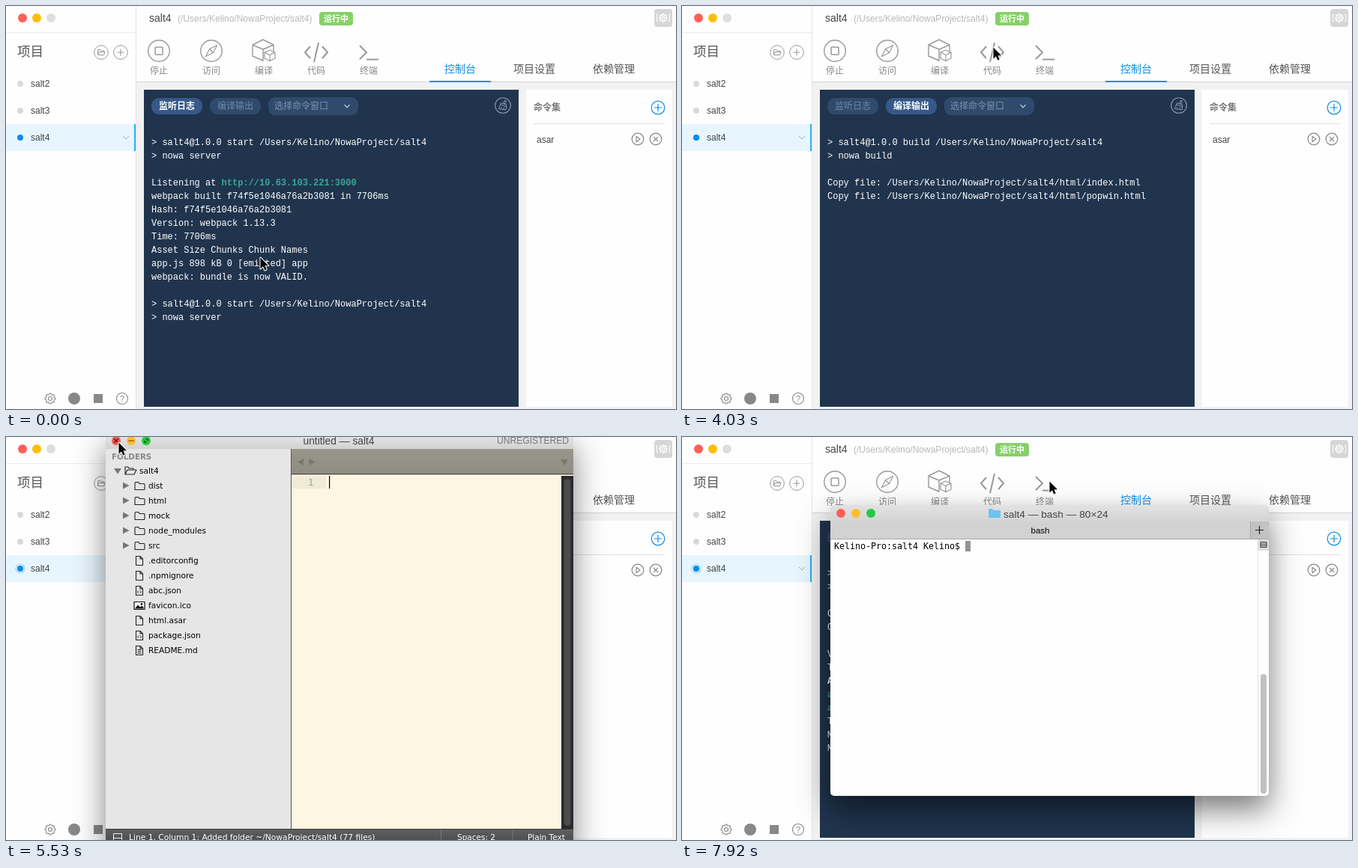
These frames come from a looping animation (894 by 539 pixels, 8000 ms). An HTML page with a canvas:

```html
<!DOCTYPE html>
<html lang="zh">
<head>
<meta charset="utf-8">
<title>Console</title>
<style>
html, body { margin: 0; width: 100%; height: 100%; overflow: hidden; background: #fff; }
canvas { display: block; width: 894px; height: 539px; }
</style>
</head>
<body>
<canvas id="stage"></canvas>
<script>
const W = 894, H = 539, LOOP = 8000;
const canvas = document.getElementById('stage');
const c = canvas.getContext('2d');
const dpr = window.devicePixelRatio || 1;
canvas.width = W * dpr;
canvas.height = H * dpr;

const UI = '"Liberation Sans", "Noto Sans CJK SC", "Noto Sans CJK", sans-serif';
const COURIER = '"Liberation Mono", monospace';
const MENLO = '"DejaVu Sans Mono", monospace';
const LUCIDA = '"DejaVu Sans", sans-serif';
const BLUE = '#108ee9', GREY = '#999';
const USER = 'Kelino';
const ROOT = `/Users/${USER}/NowaProject/salt4`;

const TICK = 150, SHORT = [19, 26, 43, 46, 50];
const tickStart = k => k === 53 ? 7920 : k * TICK - 10 * SHORT.filter(s => s <= k).length;
const STARTS = Array.from({ length: 54 }, (_, k) => tickStart(k));

// Ticks at which something switches
const AT = {
  relisten: 4, hoverBuild: 15, buildTab: 17, build: 20, leaveBuild: 23, copy: 24, hoverCode: 24,
  leaveCode: 27, editor: 28, focus: 30, folder: 31, closeHover: 36, closed: 38,
  stats: 40, pool: 42, hoverTerm: 42, minify: 48, minify2: 49, leaveTerm: 50,
  terminal: 52, prompt: 53
};

// tick, x, y of the pointer; linear in between
const PATH = [
  [0, 339, 336], [1, 333, 336], [11, 333, 336], [14, 338, 130], [16, 343, 56], [18, 341, 58],
  [22, 341, 58], [25, 412, 62], [26, 415, 55], [31, 415, 55], [35, 190, 18], [36, 153, 9],
  [37, 150, 7], [38, 367, 34], [39, 455, 48], [40, 502, 56], [41, 521, 62], [43, 490, 59], [53, 490, 59]
];

// *bold*, ~teal~
const WATCH = [
  `> salt4@1.0.0 start ${ROOT}`, '> nowa server', '',
  'Listening at ~http://10.63.103.221:3000~',
  'webpack built f74f5e1046a76a2b3081 in 7706ms', 'Hash: f74f5e1046a76a2b3081',
  'Version: webpack 1.13.3', 'Time: 7706ms', 'Asset Size Chunks Chunk Names',
  'app.js 898 kB 0 [emitted] app', 'webpack: bundle is now VALID.', '',
  `> salt4@1.0.0 start ${ROOT}`, '> nowa server', '',
  'Listening at ~http://10.63.103.221:3000~'
];
const BUILD = [
  `> salt4@1.0.0 build ${ROOT}`, '> nowa build', '',
  `Copy file: ${ROOT}/html/index.html`, `Copy file: ${ROOT}/html/popwin.html`, '',
  'Version: webpack *1.13.3*', 'Time: *2260*ms', '*Asset Size Chunks Chunk Names*',
  '~app.js~ 29.5 kB *0* ~[emitted]~ app', '~app.css~ 132 bytes *0* ~[emitted]~ app',
  'Thread Pool Size: 2', `Minify file: ${ROOT}/dist/app.js`, `Minify file: ${ROOT}/dist/app.css`
];

function text(s, x, y, size, color, { font = UI, weight = 'normal', align = 'left' } = {}) {
  c.font = `${weight} ${size}px ${font}`;
  c.fillStyle = color;
  c.textAlign = align;
  c.fillText(s, x, y + size * 0.37);
}
function rect(x, y, w, h, color) {
  c.fillStyle = color;
  c.fillRect(x, y, w, h);
}
function pill(x, y, w, h, r, color) {
  c.beginPath();
  c.roundRect(x, y, w, h, r);
  c.fillStyle = color;
  c.fill();
}
function disc(x, y, r, color) {
  c.beginPath();
  c.arc(x, y, r, 0, 7);
  c.fillStyle = color;
  c.fill();
}
function ring(x, y, r, color, width = 1.1) {
  c.beginPath();
  c.arc(x, y, r, 0, 7);
  c.strokeStyle = color;
  c.lineWidth = width;
  c.stroke();
}
// SVG path drawn with its origin at x, y
function draw(d, x, y, stroke, width = 1.1, fill) {
  const p = new Path2D(d);
  c.save();
  c.translate(x, y);
  c.lineJoin = 'round';
  if (fill) { c.fillStyle = fill; c.fill(p); }
  if (stroke) { c.strokeStyle = stroke; c.lineWidth = width; c.stroke(p); }
  c.restore();
}
function gradient(y0, y1, a, b) {
  const g = c.createLinearGradient(0, y0, 0, y1);
  g.addColorStop(0, a);
  g.addColorStop(1, b);
  return g;
}
function shadowed(alpha, blur, dy, paint) {
  c.save();
  c.shadowColor = `rgba(0,0,0,${alpha})`;
  c.shadowBlur = blur * dpr;
  c.shadowOffsetY = dy * dpr;
  paint();
  c.restore();
}
function gear(x, y, r, color, width) {
  c.beginPath();
  for (let i = 0; i <= 64; i++) {
    const a = i / 64 * Math.PI * 2, q = r + Math.max(-0.7, Math.min(0.7, Math.cos(a * 8) * 1.4));
    c.lineTo(x + Math.cos(a) * q, y + Math.sin(a) * q);
  }
  c.strokeStyle = color;
  c.lineWidth = width;
  c.stroke();
  ring(x, y, r * 0.4, color, width);
}

function sidebar(k) {
  rect(0, 0, 173, H, '#fefefe');
  rect(173, 0, 1, H, '#e4e4e4');
  rect(0, 35, 173, 1, '#ececec');
  ['#ff5f57', '#ffbd05', '#dedede'].forEach((col, i) => disc(22 + 19 * i, 16, 6, col));
  text('项目', 15, 61, 17.5, '#555');
  ring(127, 62, 9.3, GREY, 1);
  draw('M-4.5 3.5V-3.5H-1L0-2H4V-.5M-4.5 3.5L-3-.5H5L3.8 3.5Z', 127, 62, GREY, 1);
  ring(153, 62, 9.3, GREY, 1);
  draw('M-4.5 0H4.5M0-4.5V4.5', 153, 62, GREY, 1.1);

  rect(0, 158, 173, 36, '#e7f5fe');
  rect(171, 158, 2, 36, '#2db0ee');
  ['salt2', 'salt3', 'salt4'].forEach((s, i) => {
    const y = 104 + 36 * i;
    disc(19, y, 4, i === 2 ? '#0a8cf0' : '#d9d9d9');
    text(s, 33, y, 12, '#444');
  });
  draw('M-4-2L0 2L4-2', 160, 176, '#9ab', 1);

  // status pulse, 1.2 s per beat
  const p = (k * TICK + 1070) % 1200 / 1200;
  const e = p * p * (3 - 2 * p), scale = 0.8 + 1.6 * e, fade = 0.5 * (1 - e);
  if (scale > 1 && fade > 0.05) {
    c.globalAlpha = fade;
    ring(19, 176, 4 * scale - scale / 2, '#0a8cf0', scale);
    c.globalAlpha = 1;
  }

  gear(59, 525, 6.3, '#888', 1.1);
  disc(91, 525, 8, '#888');
  rect(117, 519, 12, 12, '#888');
  ring(155, 525, 7.5, '#888', 1.1);
  text('?', 155, 525, 11, '#888', { align: 'center' });
}

function toolbar(hover) {
  rect(174, 0, W - 174, 101, '#fefefe');
  rect(174, 101, W - 174, 1, '#d4d4d4');
  text('salt4', 191, 16, 14, '#444');
  text(`(${ROOT})`, 229, 17, 12, '#b8b8b8');
  pill(418, 8, 45, 18, 4, '#87d068');
  text('运行中', 440.5, 17, 11, '#fff', { align: 'center', weight: 'bold' });
  pill(865, 4, 24, 24, 4, '#d6d6d6');
  gear(877, 16, 4.6, '#fff', 1.3);
  draw('M-7-4.5H-8.5V4.5H-7M7-4.5H8.5V4.5H7', 877, 16, '#fff', 1);

  const tint = i => hover === i ? BLUE : GREY;
  ring(204, 60, 14.3, GREY, 1.4);
  draw('M-4-5H4Q5-5 5-4V4Q5 5 4 5H-4Q-5 5-5 4V-4Q-5-5-4-5Z', 204, 60, GREY, 1.5);
  ring(274, 60, 14.3, GREY, 1.4);
  draw('M7.5-7.5L2.5 2.5L-7.5 7.5L-2.5-2.5ZM-2.5-2.5L2.5 2.5', 274, 60, GREY, 1.2);
  draw('M-14-7L0-14L14-7L0-1ZM-14-7V8L0 14V-1M14-7V4', 343, 59, tint(2), 1.4);
  draw('M-7-4L0-7L7-4V4L0 7.5L-7 4ZM-7-4L0-.5L7-4M0-.5V7.5', 352, 66, tint(2), 1.2, '#fefefe');
  draw('M-8-8L-15 0L-8 8M8-8L15 0L8 8M3-13L-3 13', 414, 62, tint(3), 2);
  draw('M-12-9L-3 0L-12 9M-3 9.5H13', 484, 62, tint(4), 2);
  ['停止', '访问', '编译', '代码', '终端'].forEach((s, i) =>
    text(s, 204 + 70 * i, 87, 12, hover === i ? BLUE : '#888',
      { align: 'center', weight: hover === i ? 'bold' : 'normal' }));

  text('控制台', 606, 84, 14, BLUE, { align: 'center' });
  text('项目设置', 705, 84, 14, '#555', { align: 'center' });
  text('依赖管理', 811, 84, 14, '#555', { align: 'center' });
  rect(565, 100, 82, 2, BLUE);
}

function commands() {
  rect(694, 112, 195, 424, '#fefefe');
  text('命令集', 704, 136, 12, '#777', { weight: 'bold' });
  ring(870, 136, 8.8, BLUE, 1.2);
  draw('M-5 0H5M0-5V5', 870, 136, BLUE, 1.2);
  rect(704, 157, 175, 1, '#e0e0e0');
  text('asar', 708, 179, 12, '#444');
  ring(843, 178, 7.8, '#888', 1.2);
  draw('M-2-3.8L3 0L-2 3.8Z', 843, 178, '#888', 1.1);
  ring(867, 178, 7.8, '#888', 1.2);
  draw('M-3-3L3 3M3-3L-3 3', 867, 178, '#888', 1.1);
}

function logLine(s, y) {
  let x = 194;
  s.split(/([*~][^*~]+[*~])/).forEach(part => {
    const mark = /^[*~]/.test(part) ? part[0] : '';
    const run = mark ? part.slice(1, -1) : part;
    text(run, x, y, 12, mark === '~' ? '#3ca595' : '#fff',
      { font: COURIER, weight: mark ? 'bold' : 'normal' });
    x += c.measureText(run).width;
  });
}

function logPanel(k) {
  rect(184, 112, 500, 424, '#20344d');
  const building = k >= AT.buildTab;
  ['监听日志', '编译输出'].forEach((s, i) => {
    const on = building === (i === 1), x = 194 + 78 * i;
    pill(x, 123, 68, 22, 10, on ? '#36598a' : '#2f4a6c');
    text(s, x + 34, 134, 12, on ? '#fff' : '#7388a4', { align: 'center', weight: on ? 'bold' : 'normal' });
  });
  pill(350, 122, 120, 24, 9, '#2f4a6c');
  text('选择命令窗口', 358, 134, 12, '#7d91ab');
  draw('M-3.5-2L0 1.7L3.5-2', 455, 134, '#b4c0cf', 1.3);

  const count = !building ? (k >= AT.relisten ? 16 : 14)
    : k >= AT.minify2 ? 14 : k >= AT.minify ? 13 : k >= AT.pool ? 12
    : k >= AT.stats ? 11 : k >= AT.copy ? 5 : k >= AT.build ? 2 : 0;
  (building ? BUILD : WATCH).slice(0, count).forEach((s, i) => logLine(s, 182 + 18 * i));
  if (count) {
    ring(663, 133, 10.3, '#8b9bb1', 1.1);
    draw('M2.5-7L4.5-6L3-2L1-2.8ZM-2.5-3.5L5-.5L4 6L-5.5 4.5ZM-3.5-1.2L4.6 1.8M-2.5 4.5L-2 2M1 5L1.4 2.6',
      663, 133, '#8b9bb1', 1);
  }
}

function fileIcon(kind, x, y) {
  if (kind === 'dir') draw('M-6 5V-4Q-6-5-5-5H-1L0-3H6Q7-3 7-2V4Q7 5 6 5Z', x, y, '#222', 1.1);
  else if (kind === 'img') {
    draw('M-7-5H7V5H-7Z', x, y, '#111', 1.2, '#fff');
    draw('M-6 4L-2-1L1 2L4 0L6 4Z', x, y, null, 0, '#111');
    disc(x + 3, y - 2, 1.4, '#111');
  } else {
    draw('M-4.5-6H1L4.5-2.5V6H-4.5ZM1-6V-2.5H4.5', x, y, '#222', 1.1);
    if (kind === 'code') draw('M-1 0L-2.5 1.7L-1 3.4M1 0L2.5 1.7L1 3.4', x, y, '#222', 1);
    if (kind === 'md') draw('M-2.5-1H2.5M-2.5 1.3H2.5M-2.5 3.6H2.5', x, y, '#222', 1);
  }
}

function fileTree() {
  rect(133, 16, 247, 508, '#e6e6e6');
  rect(380, 16, 1, 508, '#555');
  text('FOLDERS', 141, 26, 10.3, '#888', { font: LUCIDA, weight: 'bold' });
  draw('M-5-3.5H5L0 4Z', 149, 45.5, null, 0, '#777');
  draw('M-7 5V-5H-3L-2-3H4V-1M-7 5L-4-1H8L5 5Z', 166, 45, '#222', 1.1);
  text('salt4', 178, 45, 10.6, '#000', { font: LUCIDA });
  const files = [
    ['dist', 'dir'], ['html', 'dir'], ['mock', 'dir'], ['node_modules', 'dir'], ['src', 'dir'],
    ['.editorconfig'], ['.npmignore'], ['abc.json', 'code'], ['favicon.ico', 'img'],
    ['html.asar'], ['package.json', 'code'], ['README.md', 'md']
  ];
  files.forEach(([name, kind], i) => {
    const y = 65 + 20 * i;
    if (kind === 'dir') draw('M-4-4.5V4.5L4.5 0Z', 160, y, null, 0, '#777');
    fileIcon(kind, 178, y + 0.5);
    text(name, 190, y, 10.6, '#000', { font: LUCIDA });
  });
}

function editor(k) {
  const active = k >= AT.focus, folder = k >= AT.folder, hot = k >= AT.closeHover;
  const left = folder ? 381 : 133;
  shadowed(active ? 0.48 : 0.28, active ? 40 : 22, active ? 18 : 8,
    () => pill(133, -6, 624, 560, 5, '#ddd'));
  rect(133, 0, 624, 16, active ? gradient(0, 16, '#e2e2e2', '#d2d2d2') : '#f6f6f6');
  ['#ef5b53', '#fdbc35', '#27c93f'].forEach((col, i) =>
    disc(147 + 20 * i, 5, 6, active ? col : '#dcdcdc'));
  if (hot) {
    draw('M-2.8-2.8L2.8 2.8M2.8-2.8L-2.8 2.8', 147, 5, '#6b0d08', 1.3);
    draw('M-3.5 0H3.5', 167, 5, '#985700', 1.4);
    draw('M-2.8-1V2.8H1ZM2.8 1V-2.8H-1Z', 187, 5, null, 0, '#075c12');
  }
  text('untitled — salt4', 444, 5, 13.8, active ? '#444' : '#aaa', { align: 'center' });
  text('UNREGISTERED', 655, 4.5, 12.1, '#777');

  rect(left, 16, 757 - left, 33, gradient(16, 49, '#98958a', '#908d82'));
  draw('M4-4.5V4.5L-4 0Z', left + 12, 33.5, null, 0, '#7a776d');
  draw('M-4-4.5V4.5L4 0Z', left + 27.5, 33.5, null, 0, '#7a776d');
  draw('M-4.5-4H4.5L0 4Z', 745, 34, null, 0, '#7a776d');
  rect(left, 49, 757 - left, 1.5, '#4b4a40');
  rect(left, 50.5, 757 - left, 474, '#fdf6e3');
  rect(left, 52, 46, 17, '#f0ead8');
  text('1', left + 25.5, 60.5, 12, '#a3a091', { font: MENLO, align: 'center' });
  if (folder && Math.floor(STARTS[k] / 500) % 2) rect(431, 52, 1.2, 17, '#000');
  rect(741, 52, 16, 472, '#2a2a2a');
  pill(744.5, 56, 9, 464, 4.5, '#4b4b4b');
  if (folder) fileTree();

  rect(133, 524, 624, 15, gradient(524, 539, '#606060', '#505050'));
  rect(133, 524, 624, 1, '#3a3a3a');
  draw('M-5.5-5H5.5V5H-5.5ZM-5.5 1H5.5', 149, 535.5, '#eee', 1);
  const status = 'Line 1, Column 1' + (folder ? ': Added folder ~/NowaProject/salt4 (77 files)' : '');
  const label = { font: LUCIDA };
  text(status, 164, 535, 10.7, '#fff', label);
  const dx = folder ? 17 : 0;
  rect(563 + dx, 525, 1, 14, '#777');
  rect(658.5 + dx, 525, 1, 14, '#777');
  text('Spaces: 2', 585 + dx, 535, 10.5, '#fff', label);
  text('Plain Text', 679 + dx, 535, 10.5, '#fff', label);
}

function terminal(k) {
  shadowed(0.52, 40, 18, () => pill(198, 91, 585, 389, 5, '#fefefe'));
  c.save();
  c.beginPath();
  c.roundRect(198, 91, 585, 389, 5);
  c.clip();
  rect(198, 91, 585, 22, gradient(91, 113, '#e2e2e2', '#d4d4d4'));
  rect(198, 113, 585, 23, '#d2d2d2');
  rect(758, 113, 25, 23, '#c2c2c2');
  rect(758, 113, 1, 23, '#a8a8a8');
  rect(198, 136, 585, 1, '#a8a8a8');
  ['#ff5f57', '#ffbd2e', '#28c940'].forEach((col, i) => disc(212 + 20 * i, 102, 6, col));
  draw('M0 1Q0 0 1 0H5L7 2H15Q16 2 16 3V11Q16 12 15 12H1Q0 12 0 11Z', 409, 96, null, 0, '#6bc4f2');
  text('salt4 — bash — 80×24', 429, 102.5, 13.7, '#444');
  text('bash', 478, 125, 11.5, '#000', { align: 'center' });
  draw('M-5.5 0H5.5M0-5.5V5.5', 770.5, 124.5, '#222', 1.2);
  rect(768, 137, 1, 343, '#e4e4e4');
  rect(768, 137, 15, 15, '#dedede');
  draw('M-4-3.5H4V3.5H-4ZM-4-1H4M-4 1.2H4', 776, 144, '#333', 1);
  pill(772, 317, 8, 160, 4, '#c1c1c1');
  if (k >= AT.prompt) {
    text(`${USER}-Pro:salt4 ${USER}$`, 203, 146, 11.63, '#000', { font: MENLO });
    rect(378, 139, 7, 14, '#939393');
  }
  c.restore();
}

function pointer(k, hand) {
  const i = Math.max(1, PATH.findIndex(p => p[0] >= k));
  const [k0, x0, y0] = PATH[i - 1], [k1, x1, y1] = PATH[i];
  const f = (k - k0) / (k1 - k0);
  const x = Math.round(x0 + (x1 - x0) * f), y = Math.round(y0 + (y1 - y0) * f);
  if (hand) {
    draw('M0 1.5a1.5 1.5 0 0 1 3 0V6a1.5 1.3 0 0 1 2.8.4a1.5 1.3 0 0 1 2.7.6a1.4 1.3 0 0 1 2.5 1V12' +
      'c0 2-1.5 3-1.5 5H2.5C2 14.5-1 13-3 9.6a1.4 1.4 0 0 1 2.2-1.4L0 9Z' +
      'M4 11V14.5M6 11V14.5M8 11V14.5', x - 1, y, '#000', 1.2, '#fff');
  } else {
    const arrow = 'M0 0V15L3.5 11.8L5.8 17L8.2 16L6 10.8H10.6Z';
    draw(arrow, x + 0.5, y + 0.5, '#fff', 2);
    draw(arrow, x + 0.5, y + 0.5, null, 0, '#000');
  }
}

function render(t) {
  const k = STARTS.findLastIndex(s => s <= t);
  const within = (a, b) => k >= a && k < b;
  const hover = within(AT.hoverBuild, AT.leaveBuild) ? 2
    : within(AT.hoverCode, AT.leaveCode) ? 3
    : within(AT.hoverTerm, AT.leaveTerm) ? 4 : -1;
  c.setTransform(dpr, 0, 0, dpr, 0, 0);
  rect(0, 0, W, H, '#f2f2f2');
  sidebar(k);
  toolbar(hover);
  commands();
  logPanel(k);
  if (within(AT.editor, AT.closed)) editor(k);
  if (k >= AT.terminal) terminal(k);
  pointer(k, hover >= 0);
}

const begin = performance.now();
function loop() {
  render((performance.now() - begin) % LOOP);
  requestAnimationFrame(loop);
}
loop();
</script>
</body>
</html>
```
